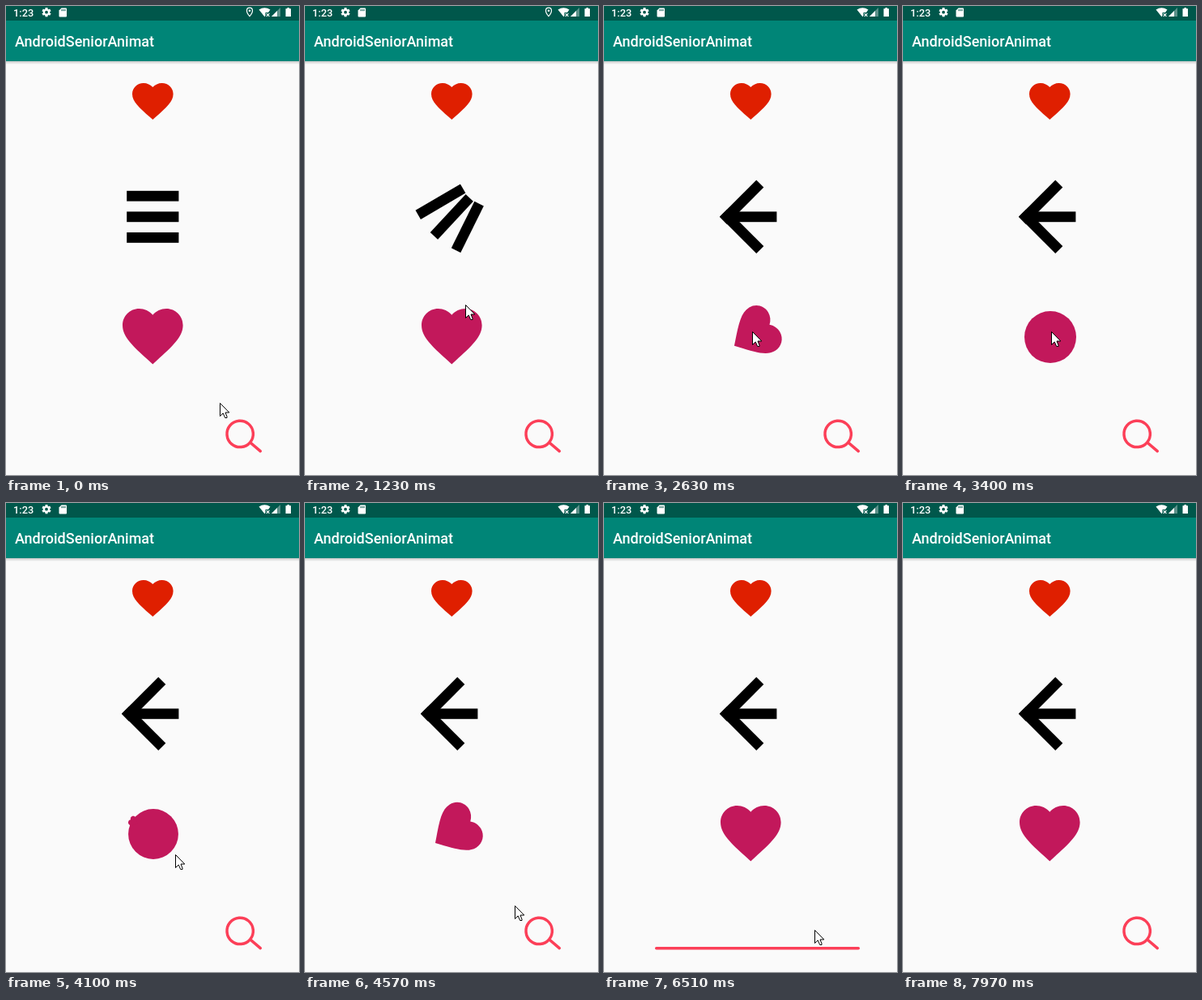
An HTML page with a canvas that plays this animation: 362 px wide and 578 px high, repeating every 8350 ms.

```html
<!DOCTYPE html>
<html lang="en">
<head>
<meta charset="utf-8">
<title>Animated icons</title>
<style>
  html, body { margin: 0; width: 100%; height: 100%; overflow: hidden; background: #fafafa; }
  canvas { display: block; }
</style>
</head>
<body>
<canvas id="stage" width="362" height="578"></canvas>
<script>
const ctx = document.getElementById('stage').getContext('2d');
const LOOP = 8350, DURATION = 1000, PRESS = 150;
const RED = '#df1f00', PINK = '#c2185b', CORAL = '#fc3f58', TEAL = '#008577', DARK_TEAL = '#00574b';
const HEART = 'M0 9.35L-1.45 8.03C-6.6 3.36-10 .28-10-3.5C-10-6.58-7.58-9-4.5-9C-2.76-9-1.09-8.19 0-6.91'
  + 'C1.09-8.19 2.76-9 4.5-9C7.58-9 10-6.58 10-3.5C10 .28 6.6 3.36 1.45 8.03z';

// Times at which a tap is released and its animation begins
const TAP = { menu: 815, toDisc: 2365, toHeart: 3835, toBar: 5330, toSearch: 6930 };

// Straight pointer trips; bend bows the path sideways
const TRIPS = [
  { from: 70, to: 370, x: 175, y: 272 },
  { from: 700, to: 1415, x: 183, y: 401, bend: 23 },
  { from: 3860, to: 4815, x: 285, y: 529 },
  { from: 5360, to: 6340, x: 260, y: 526 },
  { from: 6900, to: 7600, x: 262, y: 580 }
];

const lerp = (a, b, p) => a + (b - a) * p;
const progress = (t, from, to) => Math.min(1, Math.max(0, (t - from) / (to - from)));
const ease = (t, start) => (1 - Math.cos(Math.PI * progress(t, start, start + DURATION))) / 2;

function at(x, y, draw) {
  ctx.save();
  ctx.translate(x, y);
  draw();
  ctx.restore();
}

function rect(color, x, y, w, h) {
  ctx.fillStyle = color;
  ctx.fillRect(x, y, w, h);
}

function fill(color, d) {
  ctx.fillStyle = color;
  ctx.fill(new Path2D(d));
}

function stroke(color, width, d) {
  ctx.strokeStyle = color;
  ctx.lineWidth = width;
  ctx.stroke(new Path2D(d));
}

function disc(color, x, y, r) {
  ctx.beginPath();
  ctx.arc(x, y, r, 0, 2 * Math.PI);
  ctx.fillStyle = color;
  ctx.fill();
}

function text(str, size, x, y) {
  ctx.fillStyle = '#fff';
  ctx.font = `500 ${size}px Roboto, sans-serif`;
  ctx.fillText(str, x, y);
}

function drawStatus(t) {
  text('1:23', 12.8, 9, 12.5);
  at(50, 7.7, () => {
    for (let i = 0; i < 3; i++) {
      rect('#fff', -1.5, -5.6, 3, 11.2);
      ctx.rotate(Math.PI / 3);
    }
    disc('#fff', 0, 0, 4.2);
    disc(DARK_TEAL, 0, 0, 1.9);
  });
  at(65.5, 2.5, () => {
    fill('#fff', 'M3 0H8.5Q9.5 0 9.5 1V10Q9.5 11 8.5 11H1Q0 11 0 10V3z');
    for (let x = 3; x < 8; x += 2) rect(DARK_TEAL, x, 1.5, 1, 2.2);
  });
  if (t < TAP.toDisc) at(301, 5.7, () => {
    stroke('#fff', 1.2, 'M0-3.5C-2-3.5-3.5-2-3.5 0C-3.5 3 0 7 0 7S3.5 3 3.5 0C3.5-2 2-3.5 0-3.5z');
    disc('#fff', 0, 0, 1.3);
  });
  at(312.5, 2, () => {
    fill('#fff', 'M0 2.5Q7-2 14 2.5L11.5 6H8V10L7 11.2z');
    stroke('#fff', 1.2, 'M9.3 7.2l3.6 3.6m0-3.6l-3.6 3.6');
  });
  at(328, 2, () => {
    fill('#5c918a', 'M11 0V11H0z');
    fill('#fff', 'M7 4V11H0z');
  });
  fill('#fff', 'M345.5 3.2H347.5V2H350V3.2H352V13H345.5z');
}

function drawScreen() {
  rect('#fafafa', 0, 0, 362, 578);
  const shade = ctx.createLinearGradient(0, 68, 0, 72);
  shade.addColorStop(0, 'rgba(0,0,0,.2)');
  shade.addColorStop(1, 'rgba(0,0,0,0)');
  rect(shade, 0, 68, 362, 4);
  rect(TEAL, 0, 18, 362, 50);
  rect(DARK_TEAL, 0, 0, 362, 18);
  text('AndroidSeniorAnimat', 18, 11, 50);
}

function drawRedHeart() {
  at(181.3, 117, () => {
    ctx.scale(2.53, 2.45);
    fill(RED, HEART);
  });
}

// The heart spins and shrinks towards its lobes while a disc takes its place
function drawPinkHeart(p) {
  disc(PINK, 182, 408, 32 * Math.sin(p * Math.PI / 2));
  at(181.3, 406.6, () => {
    ctx.rotate(2 * Math.PI * p);
    ctx.translate(0, -33 * p);
    ctx.scale(3.73 * (1 - p), 3.73 * (1 - p));
    fill(PINK, HEART);
  });
}

function drawMenu(p) {
  at(181.3, 259.8, () => {
    ctx.rotate(2 * Math.PI * p);
    for (const side of [-1, 0, 1]) {
      at(-11.2 * p * Math.abs(side), side * lerp(25.6, 18.1, p), () => {
        ctx.rotate(side * p * Math.PI / 4);
        rect('#000', -32.1, -6.4, 64.2, 12.8);
      });
    }
  });
}

// The lens is trimmed from its joint onwards while the bar grows from the handle
function drawSearch(p) {
  const cx = 289.2, cy = 527.4, r = 16.2, joint = 40 * Math.PI / 180;
  const endX = 314.3, endY = 548.7;
  const handle = Math.hypot(endX - cx, endY - cy) - r;
  ctx.save();
  ctx.strokeStyle = CORAL;
  ctx.lineWidth = 3.5;
  ctx.lineCap = 'round';
  if (p > 0) {
    ctx.beginPath();
    ctx.moveTo(endX, endY);
    ctx.lineTo(endX - 249.6 * p, endY);
    ctx.stroke();
  }
  if (p < 1) {
    ctx.setLineDash([(handle + 2 * Math.PI * r) * (1 - p) + .1, 999]);
    ctx.beginPath();
    ctx.moveTo(endX, endY);
    ctx.arc(cx, cy, r, joint, joint - 2 * Math.PI, true);
    ctx.stroke();
  }
  ctx.restore();
}

function drawPointer(t) {
  let x = 264, y = 489;
  for (const trip of TRIPS) {
    const p = progress(t, trip.from, trip.to);
    x = lerp(x, trip.x, p) + (trip.bend || 0) * Math.sin(Math.PI * p);
    y = lerp(y, trip.y, p);
  }
  at(Math.round(x) + .5, Math.round(y) + .5, () => {
    if (Object.values(TAP).some(tap => t >= tap - PRESS && t < tap))
      stroke('#000', 1, 'M-14 0A14 14 0 0 1 14 0A14 14 0 0 1-14 0z');
    const arrow = 'M0 0V16L3.7 12.4L6.2 18H8.5V16.5L6.5 11.5H11.3z';
    fill('#fff', arrow);
    stroke('#000', 1, arrow);
  });
}

function frame(now) {
  const t = now % LOOP;
  drawScreen();
  drawStatus(t);
  drawRedHeart();
  drawMenu(ease(t, TAP.menu));
  drawPinkHeart(ease(t, TAP.toDisc) - ease(t, TAP.toHeart));
  drawSearch(ease(t, TAP.toBar) - ease(t, TAP.toSearch));
  drawPointer(t);
  requestAnimationFrame(frame);
}
requestAnimationFrame(frame);
</script>
</body>
</html>
```
